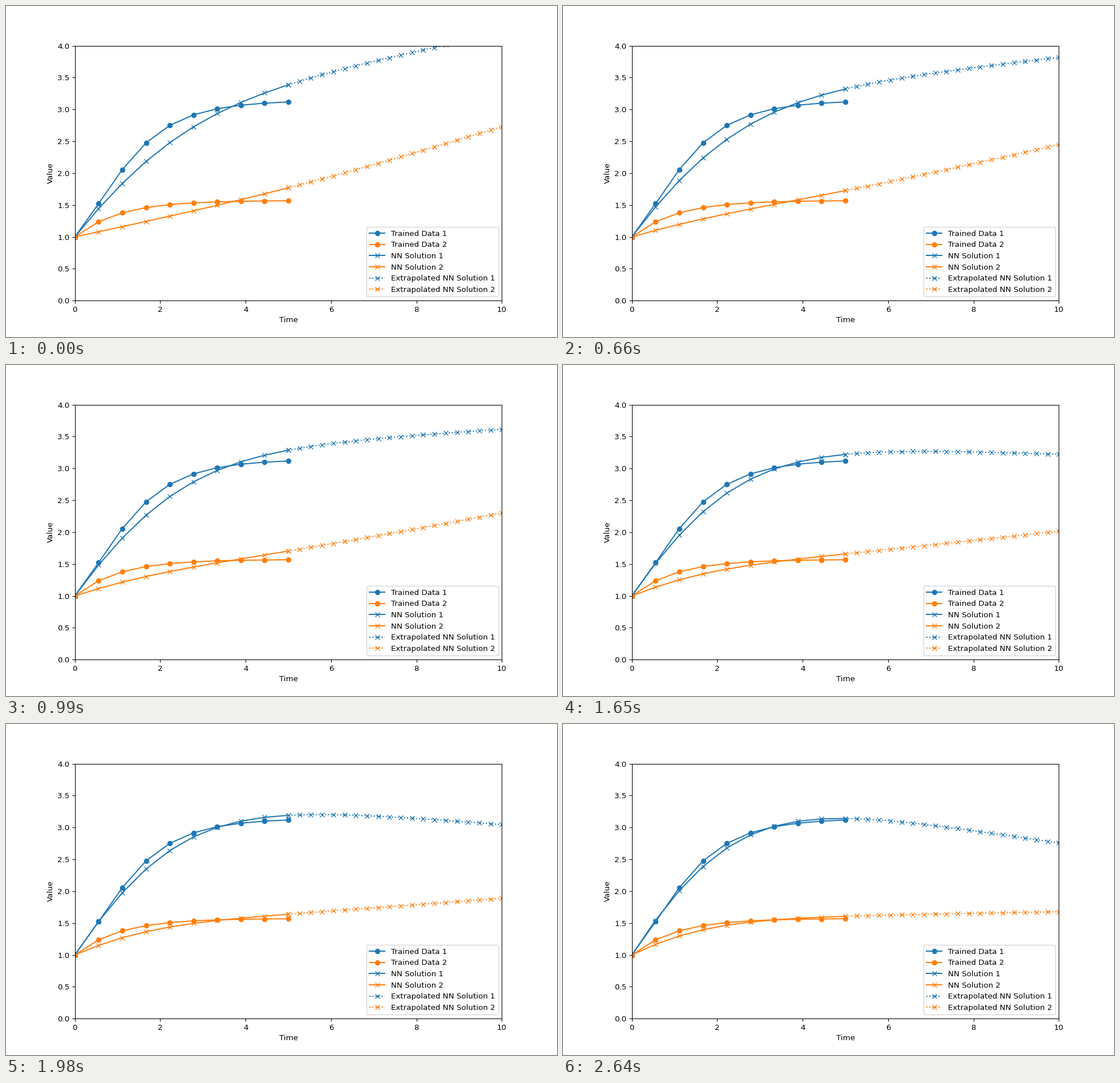
A matplotlib script for the animation above (4970 ms loop, 966 by 580 pixels).

```python
import matplotlib.pyplot as plt
import numpy as np
from matplotlib.animation import FuncAnimation

DPI = 96.6
LOOP_MS = 4970
TICK_MS = 35
STEP_MS = 330
LAST_STEP = 8


def softplus(x):
    return np.logaddexp(0, x)


def bend(t, y5, y10, t0, k):
    """Curve from 1 through y5 at t = 5 and y10 at t = 10.

    Its slope changes along a sigmoid centred at t0 with rate k.
    """
    def g(t):
        return (softplus(k * (t - t0)) - softplus(-k * t0)) / k

    m, d = np.linalg.solve([[5, g(5)], [10, g(10)]], [y5 - 1, y10 - 1])
    return 1 + m * t + d * g(t)


def progress(step):
    u = step / LAST_STEP
    return u + 0.355 * u**2 * (1 - u)


t_train = np.linspace(0, 5, 10)
t_extra = np.linspace(5, 10, 20)

# Exact solutions of x' = sin(x) and y' = cos(y) with x(0) = y(0) = 1.
exact = [
    2 * np.arctan(np.tan(0.5) * np.exp(t_train)),
    np.arcsin(np.tanh(t_train + np.arctanh(np.sin(1)))),
]

# Shape of each network curve before and after training.
nets = [
    ((3.387, 4.202, 1.3, 0.67), (3.141, 2.756, 1.5, 0.78)),
    ((1.771, 2.729, 5.0, 0.60), (1.605, 1.677, 0.6, 0.90)),
]

# The small margin keeps the pixel size from being rounded down.
fig, ax = plt.subplots(figsize=(966.001 / DPI, 580.001 / DPI), dpi=DPI)

for n, values in enumerate(exact):
    ax.plot(t_train, values, "o-", color=f"C{n}", label=f"Trained Data {n + 1}")

curves = []
for t, style, name in ((t_train, "x-", "NN Solution"),
                       (t_extra, "x:", "Extrapolated NN Solution")):
    for n, (before, after) in enumerate(nets):
        start, end = bend(t, *before), bend(t, *after)
        line, = ax.plot(t, start, style, color=f"C{n}", label=f"{name} {n + 1}")
        curves.append((line, start, end))

ax.set(xlim=(0, 10), ylim=(0, 4), xlabel="Time", ylabel="Value")
ax.legend(loc="lower right")


def update(i):
    # Steps are hard changes; a tick shows the step reached by its end.
    step = min(((i + 1) * TICK_MS - 1) // STEP_MS, LAST_STEP)
    p = progress(step)
    for line, start, end in curves:
        line.set_ydata(start + p * (end - start))
    return [line for line, _, _ in curves]


anim = FuncAnimation(fig, update, frames=LOOP_MS // TICK_MS, interval=TICK_MS,
                     repeat=True, repeat_delay=0)
plt.show()
```
